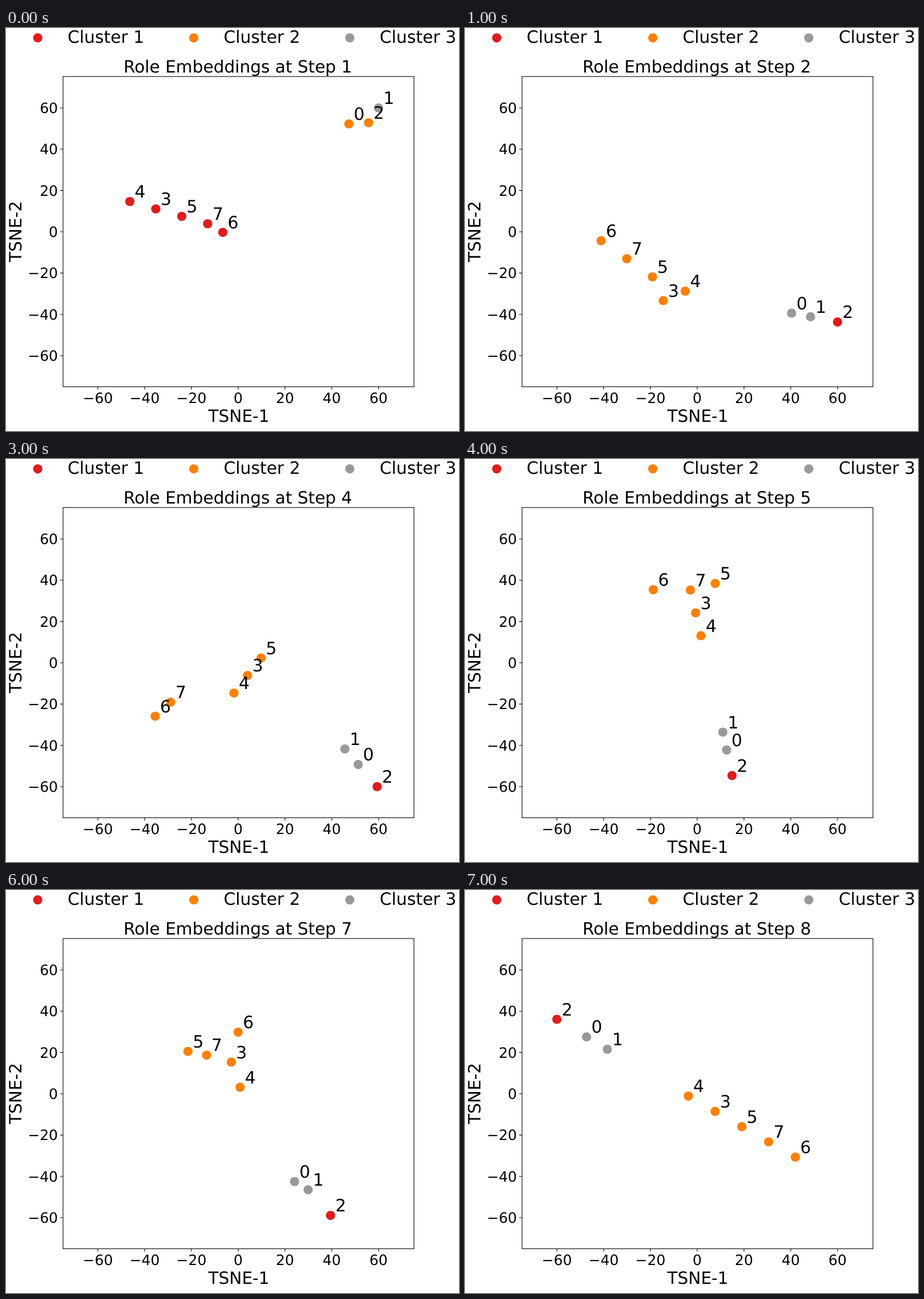
Write an HTML page that moves like this. It is 794 px wide and 706 px high and loops after 8 s.

```html
<!DOCTYPE html>
<html lang="en">
<head>
<meta charset="utf-8">
<title>Role Embeddings</title>
<style>
  html, body { margin: 0; width: 100%; height: 100%; overflow: hidden; background: #fff; }
  svg { display: block; width: 794px; height: 706px; font: 29.8px "DejaVu Sans", sans-serif; text-rendering: geometricPrecision; }
  .label { font-size: 29.6px; }
  .tick { font-size: 25px; }
  .frame { fill: none; stroke: #000; stroke-width: 1.1; }
</style>
</head>
<body>
<svg id="plot" viewBox="0 0 794 706"></svg>
<script>
const RED = '#e41a1c', ORANGE = '#ff7f00', GREY = '#999999';
const STEP_MS = 1000, RADIUS = 8.1, CENTRE = { x: 407, y: 357 };

// Walks through the points named in path; those without a key are
// spaced between their neighbours. A bend above 1 pulls them backwards.
function chain(path, keys, bend = 1) {
  const points = {};
  const fixed = [...path].filter(id => id in keys);
  fixed.forEach((id, n) => {
    const next = fixed[n + 1] ?? id;
    const from = path.indexOf(id), span = path.indexOf(next) - from;
    points[id] = keys[id];
    for (let k = 1; k < span; k++) {
      points[path[from + k]] = mix(keys[id], keys[next], (k / span) ** bend);
    }
  });
  return points;
}

const mix = (a, b, t) => a.map((v, i) => v + (b[i] - v) * t);
const layout = (trio, trioKeys, five, fiveKeys) =>
  ({ ...chain(trio, trioKeys, 1.28), ...chain(five, fiveKeys) });
const mapPoints = (points, fn) =>
  Object.fromEntries(Object.entries(points).map(([id, p]) => [id, fn(p, id)]));
const mirror = points => mapPoints(points, ([x, y]) => [2 * CENTRE.x - x, y]);
const blend = (a, b, t) => mapPoints(a, (p, id) => mix(p, b[id], t));

const opening = layout(
  '021', { 0: [601, 168], 2: [635.5, 166], 1: [653, 140] },
  '43576', { 4: [217, 304], 7: [353.5, 343], 6: [380, 358] });
const falling = layout(
  '012', { 0: [572.5, 499.5], 2: [653, 515] },
  '67534', { 6: [238.5, 372.5], 5: [328.5, 436], 3: [347.5, 477.5], 4: [386, 461] });
const rising = layout(
  '102', { 1: [594, 508], 2: [650.5, 574] },
  '67435', { 6: [261.5, 450.5], 7: [288.5, 426], 4: [399.5, 410], 5: [447, 348.5] });
const upright = layout(
  '102', { 1: [452, 478.5], 2: [468, 554.5] },
  '65734', { 6: [330, 229], 5: [438.5, 218], 7: [395, 229.5], 4: [413.5, 309.5] });
const forked = layout(
  '012', { 0: [517.5, 511], 2: [594, 574] },
  '57346', { 5: [289, 299], 3: [392.5, 309.5], 4: [409.5, 354.5], 6: [426, 254] });
const diagonal = layout(
  '102', { 1: [249.5, 279], 2: [161, 226.5] },
  '43576', { 4: [391.5, 361], 6: [579, 468] });

const steps = [
  opening, falling, mirror(rising), rising,
  upright, forked, blend(upright, forked, 0.8), diagonal
];

function colorOf(id, step) {
  if (step === 0) return id > 2 ? RED : id === 1 ? GREY : ORANGE;
  return id > 2 ? ORANGE : id === 2 ? RED : GREY;
}

const plot = document.getElementById('plot');

function add(tag, attrs, text = '') {
  const el = document.createElementNS('http://www.w3.org/2000/svg', tag);
  set(el, attrs);
  el.textContent = text;
  return plot.appendChild(el);
}

function set(el, attrs) {
  for (const key in attrs) el.setAttribute(key, attrs[key]);
}

// Legend
[RED, ORANGE, GREY].forEach((fill, i) => {
  const x = i * 273.5;
  add('circle', { cx: x + 55.6, cy: 17.3, r: RADIUS, fill });
  add('text', { x: x + 108, y: 26 }, `Cluster ${i + 1}`);
});

// Axes
add('rect', { x: 100, y: 85, width: 615, height: 543.5, class: 'frame' });
for (let v = -60; v <= 60; v += 20) {
  const x = CENTRE.x + v * 4.1;
  const y = CENTRE.y - v * 3.617;
  const name = String(v).replace('-', '\u2212');
  add('path', { d: `M${x} 628.5v5M100 ${y}h-5`, class: 'frame' });
  add('text', { x, y: 657, 'text-anchor': 'middle', class: 'tick' }, name);
  add('text', { x: 91, y: y + 9, 'text-anchor': 'end', class: 'tick' }, name);
}
add('text', { x: 408, y: 690, 'text-anchor': 'middle', class: 'label' }, 'TSNE-1');
add('text', { transform: 'translate(27 356.5) rotate(-90)', 'text-anchor': 'middle', class: 'label' }, 'TSNE-2');
const title = add('text', { x: 206, y: 78, class: 'label' });

// Dots lie below all of their numbers.
const ids = [...Array(8).keys()];
const dots = ids.map(() => add('circle', { r: RADIUS }));
const numbers = ids.map(id => add('text', {}, id));

function show(step) {
  title.textContent = `Role Embeddings at Step ${step + 1}`;
  for (const id of ids) {
    const [x, y] = steps[step][id];
    set(dots[id], { cx: x, cy: y, fill: colorOf(id, step) });
    set(numbers[id], { x: x + 8.5, y: y - 7 });
  }
}

const start = performance.now();
let shown = -1;
function tick() {
  const step = Math.floor((performance.now() - start) / STEP_MS) % steps.length;
  if (step !== shown) show(shown = step);
  requestAnimationFrame(tick);
}
tick();
</script>
</body>
</html>
```
